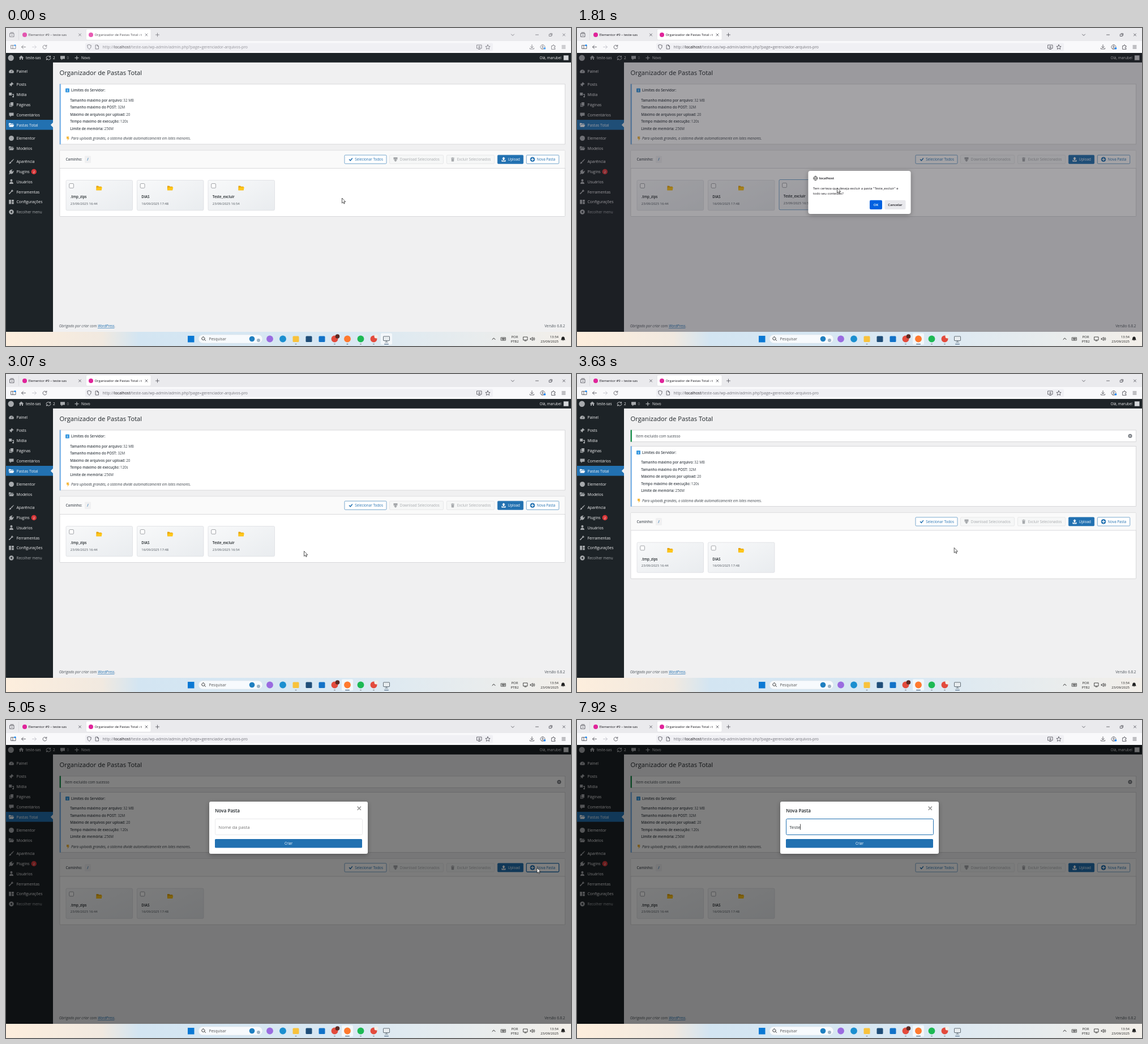
An HTML page that plays this animation: 998x561 px, repeating every 8000 ms.

```html
<!DOCTYPE html>
<html lang="pt-BR">
<head>
<meta charset="utf-8">
<title>Pastas</title>
<style>
html, body { margin: 0; width: 100%; height: 100%; overflow: hidden; }
svg { display: block; width: 100vw; height: 100vh; font-family: 'Open Sans', 'Noto Sans', sans-serif; }
text { white-space: pre; }
.b { font-weight: 600; }
.i { font-style: italic; }
.m { text-anchor: middle; }
.e { text-anchor: end; }
</style>
</head>
<body>
<svg id="stage" viewBox="0 0 998 561"></svg>
<script>
const BLUE = '#2271b1', INK = '#3c434a', DARK = '#1d2327', GREY = '#a7aaad', LINE = '#c3c4c7';
const SHIFT = 28.6, LOOP = 8000;

const rect = (x, y, w, h, fill, more = '') => `<rect x="${x}" y="${y}" width="${w}" height="${h}" fill="${fill}" ${more}/>`;
const text = (x, y, size, str, fill = INK, cls = '') => `<text x="${x}" y="${y}" font-size="${size}" fill="${fill}" class="${cls}">${str}</text>`;
const disc = (x, y, r, fill, more = '') => `<circle cx="${x}" cy="${y}" r="${r}" fill="${fill}" ${more}/>`;
const shape = (x, y, d, fill, more = '') => `<path transform="translate(${x} ${y})" d="${d}" fill="${fill}" ${more}/>`;
const line = (x, y, d, color = '#4a4a52', w = .8) => shape(x, y, d, 'none', `stroke="${color}" stroke-width="${w}" stroke-linecap="round" stroke-linejoin="round"`);
const group = (id, body, more = '') => `<g id="${id}" ${more}>${body}</g>`;
const edge = (color, r = 0, w = .6) => `stroke="${color}" stroke-width="${w}" rx="${r}"`;

const ICON = {
  gauge: 'M-4.5 2a4.5 4.5 0 1 1 9 0l-1 1.6h-7zM-.6 1.5h1.2l1.6-4z',
  pin: 'M.5-4.3l3.8 3.8-2 .4-1.6 1.8-.4 2-2-2-2.8 2.5 2.4-2.9-2-2 2-.4L-.3-2.5z',
  media: 'M-4.3-3.5h5v5h-5zM1.5-1h3v4.5a1.4 1.4 0 1 1-1-1.2V.5h-2z',
  pages: 'M-1.5-4h5v6.2h-5zM-3.5-2.5h1.2v5.6h4v1h-5.2z',
  comment: 'M-4-3.5h8v5.3h-3.8l-2.4 2.3v-2.3h-1.8z',
  folder: 'M-4.6-3.3h3l1 1h4v1.2h-6.3l-1.7 4zM-2.6-.3h7.4l-1.5 3.8h-7.4z',
  brush: 'M4-4.5l.5.5-4 5-1.4-1.2zM-1.5.3l1.5 1.4q-1 2.5-4.5 2.2 1.5-1 1.5-2.6z',
  plug: 'M1-4l1 1-1.6 1.6 1.6 1.6L3.6-1.4l1 1L3 1.2l.6.6-2 2q-2 1-3.6-.2l-1.5 1.4-1-1L-3 2.5q-1.2-1.6-.2-3.6l2-2 .6.6z',
  user: 'M0-4.2a2 2 0 1 1-.1 0zM-3.5 4q0-3.8 3.5-3.8t3.5 3.8z',
  wrench: 'M4.2-2.4l-2 2q-1 .6-1.8.3L-3 3.9q-.9.5-1.4-.2-.4-.6.3-1.2L-.3-1q-.3-1 .4-1.8l1.8-1.5.1 1.7 1.2.7z',
  sliders: 'M-4.3-3.8h3.8v7.6h-3.8zM.5-3.8h3.8V-.2H.5zM.5.6h3.8v3.2H.5z',
  trash: 'M-3-3h2l.4-.8h1.2l.4.8h2v1h-6zM-2.5-1.5h5l-.4 5.3h-4.2z',
  home: 'M0-4l4.5 4H3v3.6H1V1h-2v2.6h-2V0h-1.500z',
  down: 'M-3.5-3.8h7v4H1.500v1H3L0 4.2-3 1.200h1.500v-1h-2z',
  up: 'M0-4.2l3 3H1.200v3h-2.400v-3H-3zM-3.500 1h1.300v1.700h4.400V1h1.300v3h-7z'
};
const CROSS = 'M-2-2L2 2M2-2L-2 2', PLUS = 'M-3 0H3M0-3V3';
const ARROW = 'M0 0V9l2.100-1.900 1.300 3 1.400-.6-1.300-2.900h2.800z';
const HAND = 'M0 0q.9-.3 1.100.6V4l3 .7q1 .3.900 1.300l-.6 3.800H.3L-2.600 6q.4-1 1.400-.3l.6.5V.6Q-.6.1 0 0z';

function browser() {
  const icons = line(10.500, 12, 'M-3.500-2.500h7v6h-7zM-2.500-4h5M-1 .5h2')
    + line(31, 33.500, 'M3.500 0h-7l3-3m-3 3l3 3') + line(50, 33.500, 'M-3.500 0h7l-3-3m3 3l-3 3', '#bcbcc4')
    + line(68.500, 33.500, 'M3-1.500A3.400 3.400 0 1 0 3.300 1M3.300-3.500v2.200H1')
    + line(13, 33.500, 'M-4-3h8v6h-8zM-1-3v6') + disc(16, 30.500, 1.500, '#0a84ff')
    + line(147, 33.500, 'M0-4l3.300 1.200q.3 5-3.300 6.800-3.600-1.800-3.300-6.800z')
    + line(161, 33.500, 'M-2.500-3.500h3l2 2v5h-5zM.5-3.500v2h2')
    + line(836, 33.500, 'M-4-3.500h8v6h-8zM-1.500 4h3M0-2v3m-1.300-1.300L0 1l1.300-1.300')
    + line(851, 33.500, 'M0-4l1.200 2.700 2.900.3L2 1l.6 2.900L0 2.400-2.600 3.900-2 1l-2.100-2 2.900-.3z')
    + line(929, 33.500, 'M0-4v5.500m-2.300-2.300L0 1.500l2.300-2.300M-3.500 2v1.500h7V2')
    + line(948, 33.500, 'M0-4a4 4 0 1 1-.1 0M0-2a1.200 1.200 0 1 1-.1 0M-2.500 3q2.500-3 5 0') + disc(951.500, 36, 1.800, '#0a84ff')
    + line(967, 33.500, 'M-3-2h2q-.3-2 1-2t1 2h2v2.200q-2-.3-2 1t2 1V4h-6z')
    + line(985, 33.500, 'M-3-2.500h6M-3 0h6M-3 2.500h6')
    + line(895, 12, 'M-2.500-1L0 1.500 2.500-1') + line(938, 12, 'M-2.500 0h5')
    + line(962, 12, 'M-2.300-1h3.500v3.500h-3.500zM-.8-2.300h3.400v3.400') + line(985.500, 12, CROSS)
    + line(130.500, 12, CROSS) + line(248, 12, CROSS) + line(267.500, 12, PLUS);
  return rect(0, 0, 998, 23, '#eaeaed') + rect(0, 23, 998, 21, '#f9f9fb')
    + rect(22, 3, .6, 18, '#cfcfd8') + rect(141.500, 2, 114.500, 19, '#fff', edge('#d8d8de', 2, .5))
    + rect(140, 26.500, 720, 14, '#f0f0f4', 'rx="2"')
    + group('chrome', icons + disc(33, 12, 4, '#e0249a') + disc(150, 12, 4, '#e0249a')
      + text(39.500, 14.200, 5.900, 'Elementor #9 – teste-sas', '#15141a')
      + text(156.500, 14.200, 5.900, 'Organizador de Pastas Total ‹ t', '#15141a')
      + text(170.500, 36, 6.900, '<tspan>http://</tspan><tspan fill="#15141a">localhost</tspan>/teste-sas/wp-admin/admin.php?page=gerenciador-arquivos-pro', '#74747c'));
}

function admin() {
  const menu = [[76, 'Painel', 'gauge'], [99.500, 'Posts', 'pin'], [117.500, 'Mídia', 'media'], [135, 'Páginas', 'pages'],
    [153, 'Comentários', 'comment'], [171, 'Pastas Total', 'folder'], [194.500, 'Elementor'], [212, 'Modelos', 'folder'],
    [235.500, 'Aparência', 'brush'], [253.200, 'Plugins', 'plug'], [271, 'Usuários', 'user'], [289, 'Ferramentas', 'wrench'],
    [306.700, 'Configurações', 'sliders']];
  return rect(0, 44, 998, 492, '#f0f0f1') + rect(0, 44, 998, 16.800, DARK) + rect(0, 60, 83, 476, DARK)
    + rect(0, 162, 83, 17.600, BLUE) + shape(83, 171, 'M0-4.200v8.400l-4.200-4.200z', '#f0f0f1')
    + menu.map(([y, name, icon]) => (icon ? shape(9.500, y, ICON[icon], y === 171 ? '#fff' : GREY) : disc(9.500, y, 4.500, GREY))
      + text(18.500, y + 2.700, 6.900, name, '#f0f0f1')).join('')
    + disc(49.300, 253.500, 4.700, '#d63638') + text(49.300, 255.600, 5.600, '2', '#fff', 'm')
    + disc(9.500, 324.500, 4.200, GREY) + shape(9.500, 324.500, 'M1.200-2.300v4.600L-2 0z', DARK) + text(18.500, 327, 6.400, 'Recolher menu', GREY)
    + disc(8.700, 52.700, 5.200, GREY) + shape(27, 52.500, ICON.home, GREY) + text(35, 55.300, 6.400, 'teste-sas', '#f0f0f1')
    + line(75, 52.700, 'M-4 0a4 3.500 0 0 1 7-2M3.500-3.500V-1.500H1.500M4 0a4 3.500 0 0 1-7 2M-3.500 3.500V1.500h2', GREY, 1.100)
    + text(83, 55.300, 6.400, '2', '#f0f0f1') + shape(100, 52.700, ICON.comment, GREY) + text(107.500, 55.300, 6.400, '0', '#8c8f94')
    + line(125, 52.700, PLUS, GREY, 1.300) + text(133, 55.300, 6.400, 'Novo', '#f0f0f1')
    + text(981, 55.300, 6.400, 'Olá, marubel', '#f0f0f1', 'e') + rect(985, 48.300, 8.500, 8.500, '#d5d7da', 'stroke="#8c8f94" stroke-width=".5"')
    + text(94.500, 83, 11.200, 'Organizador de Pastas Total', DARK)
    + text(93.700, 528.200, 6.400, `Obrigado por criar com <tspan fill="${BLUE}" text-decoration="underline">WordPress</tspan>.`, '#50575e', 'i')
    + text(987.500, 528.200, 6.400, 'Versão 6.8.2', '#50575e', 'e');
}

function card(x, name, date) {
  return rect(x, 268.500, 117.500, 53.200, 'url(#cardFill)', 'class="frame" ' + edge('#d4d6da', 2))
    + rect(x + 5.700, 274.500, 7.800, 7.800, '#fff', edge('#8c8f94', 1.500, .8))
    + shape(x + 58.500, 282.500, 'M-5-4h3.500l1 1.200h4.700v6.600h-9.200z', '#e8a300') + shape(x + 58.500, 282.500, 'M-3.600-1.400h9l-1.400 5.200h-9.200z', '#ffc61a')
    + text(x + 7.800, 300.300, 6.300, name, DARK, 'b') + text(x + 7.800, 311.500, 5.900, date, '#50575e');
}

function button(x, w, label, icon, fill, color, border, id = '') {
  return `<g id="${id}">` + rect(x, 224.200, w, 15.200, fill, edge(border, 1.500))
    + icon + text(x + 18.300, 234.300, 6.300, label, color) + '</g>';
}

function content() {
  const limits = ['Tamanho máximo por arquivo:|32 MB', 'Tamanho máximo do POST:|32M', 'Máximo de arquivos por upload:|20',
    'Tempo máximo de execução:|120s', 'Limite de memória:|256M'];
  return rect(95, 99, 892.500, 106, '#fff', edge(LINE)) + rect(94.700, 98.700, 2.100, 106.600, '#72aee6')
    + rect(105, 106.500, 7, 7, '#3d9be0', 'rx="1"') + text(108.500, 112.200, 5.800, 'i', '#fff', 'b m')
    + text(115, 112.200, 6.300, 'Limites do Servidor:', INK, 'b')
    + limits.map((s, i) => {
      const [key, value] = s.split('|');
      return text(113.200, 129.900 + i * 12.500, 6.250, `<tspan class="b">${key}</tspan> ${value}`);
    }).join('')
    + shape(109, 195, 'M-2-3.500h4.500l-1 2.500h1.500l-3.500 5 .6-3.500h-2z', '#f5b83d')
    + text(115, 197.300, 6.300, 'Para uploads grandes, o sistema divide automaticamente em lotes menores.', INK, 'i')
    + rect(95, 216, 892.500, 116.500, '#fff', edge(LINE, 1)) + rect(95.300, 216.300, 892, 31, '#fafafa') + rect(95, 247, 892.500, .6, LINE)
    + text(105.500, 234.300, 6.300, 'Caminho:', '#50575e', 'b') + rect(139, 225.500, 11, 12.800, '#f0f0f1', 'rx="1.500"') + text(144.500, 234.300, 6.300, '/', BLUE, 'b m')
    + button(598, 74, 'Selecionar Todos', line(609, 232, 'M-2.500 0l1.800 2L2.500-2', BLUE, 1.500), '#fff', BLUE, BLUE)
    + button(677.500, 95, 'Download Selecionados', shape(688, 231.800, ICON.down, GREY), '#f6f7f7', GREY, '#dcdcde')
    + button(778.500, 84, 'Excluir Selecionados', shape(789, 231.800, ICON.trash, GREY), '#f6f7f7', GREY, '#dcdcde')
    + button(868.300, 45.400, 'Upload', shape(879, 231.800, ICON.up, '#fff'), BLUE, '#fff', BLUE, 'upload')
    + button(919.300, 57.400, 'Nova Pasta', disc(930, 231.800, 4.300, 'currentColor') + line(930, 231.800, 'M-2.300 0h4.600M0-2.300v4.600', '#fff', 1.200), '#fff', 'currentColor', 'currentColor', 'create')
    + card(106, '.tmp_zips', '23/09/2025 16:44') + card(231.500, 'DIAS', '16/09/2025 17:48')
    + group('doomed', card(357, 'Teste_excluir', '23/09/2025 16:54')
      + group('bin', rect(452, 274, 17, 17, '#dc3545', 'rx="1.500"') + shape(460.500, 282.500, ICON.trash, '#fff')));
}

const notice = () => rect(95, 99, 892.500, 20.300, '#fff', edge(LINE)) + rect(94.700, 98.700, 2.100, 20.900, '#00843a')
  + text(104, 112, 6.300, 'Item excluído com sucesso') + disc(977, 109.300, 3.500, '#787c82') + line(977, 109.300, 'M-1.300-1.300l2.600 2.600m0-2.600l-2.600 2.600', '#fff', .8);

function taskbar() {
  const apps = [[466, '#9a6be0'], [489, '#1b8fd0'], [512, '#f8c23c', 1], [535, '#1f4e79', 1], [558, '#1272c8', 1],
    [580.500, '#e34b3d'], [603, '#ff7a2f'], [626.500, '#1db954'], [649.500, '#e34b3d']];
  return rect(0, 536, 998, 25, 'url(#barFill)')
    + rect(321, 543, 11.500, 11.500, '#0a78d4') + rect(340, 541, 113, 15, '#f7fafd', edge('#d5dce3', 7.500, .5))
    + line(349, 548, 'M-.5-3a2.700 2.700 0 1 1-.1 0M1.500 1.500l2 2', '#333', 1) + text(358.500, 551.200, 6.700, 'Pesquisar', '#555')
    + disc(434.500, 548.500, 4.800, '#1f7fc0') + disc(446, 551, 3, '#9fb4c4')
    + rect(593, 538.500, 20, 20, '#fff', 'id="focusA" fill-opacity=".65" rx="2"') + rect(662, 538.500, 20, 20, '#fff', 'id="focusB" fill-opacity=".65" rx="2"')
    + apps.map(([x, c, square]) => square ? rect(x - 5.500, 543.500, 11, 10.500, c, 'rx="1.500"') : disc(x, 548.500, 5.900, c)).join('')
    + disc(585.500, 544, 3.800, '#5b2a24') + disc(654, 544, 3.500, '#f1eee8')
    + rect(666.500, 544, 11, 7.500, '#e8edf0', edge('#55606a', .5, .9)) + line(672, 553, 'M-2.500 1h5M0-1v2', '#55606a')
    + [512, 580.500, 626.500, 649.500].map(x => rect(x - 1.500, 557, 3, 1.200, '#858c93', 'rx=".6"')).join('')
    + rect(599, 557, 8, 1.200, '#57708a', 'id="lineA" rx=".6"') + rect(668, 557, 8, 1.200, '#57708a', 'rx=".6"')
    + line(861.500, 548.500, 'M-2.500 1L0-1.500 2.500 1', '#222', 1) + line(878.500, 548.500, 'M-4-2.500h8v5h-8zM-2.500-1h5M-2.500.3h5M-1.500 1.500h3', '#222', .7)
    + text(898.500, 547, 6, 'POR', '#222', 'm') + text(898.500, 555.200, 6, 'PTB2', '#222', 'm')
    + line(917.500, 548.500, 'M-3.500-3.500h7v5.500h-7zM-1.500 3.500h3', '#222') + line(930, 548.500, 'M-3.500-1h1.500l2-2v6l-2-2h-1.500zM1.500-1.500q1 1.500 0 3M3-2.500q2 2.500 0 5', '#222')
    + text(976, 547, 6, '13:54', '#222', 'e') + text(976, 555.200, 6, '23/09/2025', '#222', 'e')
    + shape(984, 548.500, 'M0-4q2.800 0 2.800 3.500L3.600 2h-7.200l.8-2.500Q-2.800-4 0-4zM-1 2.600h2q-1 1.500-2 0z', '#222');
}

const confirmBox = () => rect(0, 44, 998, 492, '#1c1b22', 'fill-opacity=".4"')
  + rect(408.500, 252, 181, 76, '#fff', 'rx="4" filter="url(#soft)"')
  + line(421.300, 265, 'M0-3.700a3.700 3.700 0 1 1-.1 0M0-3.700q-3.500 3.700 0 7.400 3.500-3.700 0-7.400M-3.700 0h7.400', '#333', .7)
  + text(427.500, 267.300, 6.100, 'localhost', '#15141a', 'b')
  + text(417, 285.200, 5.850, 'Tem certeza que deseja excluir a pasta "Teste_excluir" e', '#15141a') + text(417, 293.600, 5.850, 'todo seu conteúdo?', '#15141a')
  + rect(517, 303.700, 22, 16.300, '#0061e0', 'id="ok" rx="2"') + text(528, 314.200, 6, 'OK', '#fff', 'b m')
  + rect(543.500, 303.700, 37, 16.300, '#e8e8ec', 'rx="2"') + text(562, 314.200, 6, 'Cancelar', '#15141a', 'b m');

const modalBox = () => rect(0, 44, 998, 492, '#000', 'fill-opacity=".5"')
  + rect(359, 144, 280, 92, '#fff', 'rx="3" filter="url(#soft)"')
  + text(369.200, 162.700, 8.100, 'Nova Pasta', DARK, 'b') + line(623.800, 155.800, 'M-2.700-2.700l5.400 5.400m0-5.400l-5.400 5.400', '#999', 1.600)
  + rect(369.500, 174.500, 260, 28, '#fff', 'id="field" ' + edge('#dcdcde', 2))
  + text(375.300, 191.700, 7.800, '', '#2c3338').replace('<text', '<text id="value"')
  + rect(0, 183.500, .7, 10.300, '#000', 'id="caret"')
  + rect(369, 210, 260, 15.500, BLUE, 'id="submit" rx="1.500"') + text(499, 220.400, 6.300, 'Criar', '#fff', 'm');

stage.innerHTML = `<defs>
  <linearGradient id="cardFill" x2="1" y2="1"><stop stop-color="#f8f9fa"/><stop offset="1" stop-color="#e9ecef"/></linearGradient>
  <linearGradient id="barFill"><stop stop-color="#fdeedd"/><stop offset=".17" stop-color="#f1e9e0"/><stop offset=".235" stop-color="#d3e5f2"/><stop offset=".6" stop-color="#d9e8f3"/><stop offset="1" stop-color="#f3efe9"/></linearGradient>
  <filter id="soft" x="-10%" y="-20%" width="120%" height="150%"><feDropShadow dx="0" dy="2" stdDeviation="4" flood-opacity=".3"/></filter></defs>`
  + browser() + admin() + group('notice', notice()) + group('content', content())
  + group('confirmBox', confirmBox()) + group('modalBox', modalBox()) + taskbar()
  + disc(0, 0, 6, '#f5e900', 'id="click" fill-opacity=".6"')
  + group('pointer', shape(0, 0, ARROW, '#fff', 'id="arrow" stroke="#111" stroke-width=".7"') + shape(0, 0, HAND, '#fff', 'id="hand" stroke="#111" stroke-width=".8"')
    + line(0, 0, 'M-1.500-4.500Q0-4.500 0-3.500V3.500Q0 4.500-1.500 4.500M1.500-4.500Q0-4.500 0-3.500M0 3.500Q0 4.500 1.500 4.500', '#222', .8).replace('<path', '<path id="beam"'));

const $ = id => document.getElementById(id);
const show = (id, on) => { $(id).style.display = on ? '' : 'none'; };
const set = (el, attrs) => { for (const k in attrs) el.setAttribute(k, attrs[k]); };

// time, x, y
const path = [[0, 593.500, 300], [50, 593.500, 300], [840, 478, 301], [890, 472, 300], [1060, 464, 295], [1310, 464, 295],
  [1500, 459.500, 282], [2170, 459.500, 282], [2670, 526.500, 312.500], [3100, 526.500, 312.500], [3400, 580, 313], [3630, 665.500, 306.500],
  [3730, 736, 302], [4300, 872, 264], [4550, 910, 259], [4600, 919.500, 260], [4750, 938, 261], [5460, 938, 261],
  [5760, 690, 224], [5880, 600, 217], [6010, 558.500, 187.500], [6560, 558.500, 187.500], [6610, 558.500, 187]];
const clicks = [[100, 250], [1600, 1740], [2960, 3070], [4900, 5050], [6160, 6300]];
const keys = [6820, 7220, 7470, 7820, 7920];

function cursorAt(t) {
  const i = path.findIndex(p => p[0] > t);
  if (i < 0) return path[path.length - 1].slice(1);
  const [t0, x0, y0] = path[i - 1], [t1, x1, y1] = path[i], k = (t - t0) / (t1 - t0);
  return [x0 + (x1 - x0) * k, y0 + (y1 - y0) * k];
}

function draw(t) {
  const [x, y] = cursorAt(t);
  const over = (l, top, w, h) => x >= l && x <= l + w && y >= top && y <= top + h;
  const active = t >= 100, asking = t >= 1810 && t < 3070, done = t >= 3350, modal = t >= 5050, focused = t >= 6200;
  const pressed = clicks.some(([a, b]) => t >= a && t < b);

  set($('chrome'), { opacity: active ? 1 : .75 });
  show('focusA', active);
  show('focusB', !active);
  set($('lineA'), { x: active ? 599 : 601.500, width: active ? 8 : 3 });

  show('notice', done);
  set($('content'), { transform: `translate(0 ${done ? SHIFT : 0})` });
  show('doomed', !done);
  const lift = t < 3070 ? Math.min(1, Math.max(0, (t - 860) / 200)) : 0;
  set($('doomed'), { transform: `translate(0 ${-lift})` });
  set(document.querySelector('#doomed .frame'), { stroke: lift > .4 ? BLUE : '#d4d6da' });
  set($('bin'), { opacity: lift });

  const onBin = !asking && !done && lift > 0 && over(452, 273, 17, 17);
  const onUpload = done && !modal && over(868, 252.500, 46, 16);
  const onCreate = done && !modal && over(919, 252.500, 58, 16);
  const onSubmit = modal && over(369, 210, 260, 15.500);
  const onField = modal && over(369, 174, 260, 28);
  set($('upload').firstChild, { fill: onUpload ? '#135e96' : BLUE });
  $('create').style.color = onCreate ? '#0a4b78' : BLUE;
  set($('create').firstChild, { fill: onCreate ? '#f0f0f1' : '#fff', 'stroke-width': modal && !focused ? 1.300 : .6 });

  show('confirmBox', asking);
  set($('ok'), { fill: !over(517, 303.700, 22, 16.300) ? '#0061e0' : pressed ? '#053e94' : '#0250bb' });

  show('modalBox', modal);
  set($('submit'), { fill: onSubmit ? '#135e96' : BLUE });
  set($('field'), { stroke: focused ? BLUE : '#dcdcde', 'stroke-width': focused ? 1 : .6 });
  const typed = 'Teste'.slice(0, keys.filter(k => t >= k).length);
  $('value').textContent = typed || 'Nome da pasta';
  set($('value'), { fill: typed ? '#2c3338' : '#757575' });
  show('caret', focused);
  if (modal) set($('caret'), { x: 375.300 + (typed ? $('value').getComputedTextLength() : 0) });

  show('click', pressed);
  set($('click'), { cx: x, cy: y });
  const hand = onBin || onUpload || onCreate || onSubmit;
  show('pointer', t < 6870);
  set($('pointer'), { transform: `translate(${x} ${y})` });
  show('hand', hand);
  show('beam', onField);
  show('arrow', !hand && !onField);
}

const start = performance.now();
function tick() {
  draw((performance.now() - start) % LOOP);
  requestAnimationFrame(tick);
}
tick();
</script>
</body>
</html>
```
